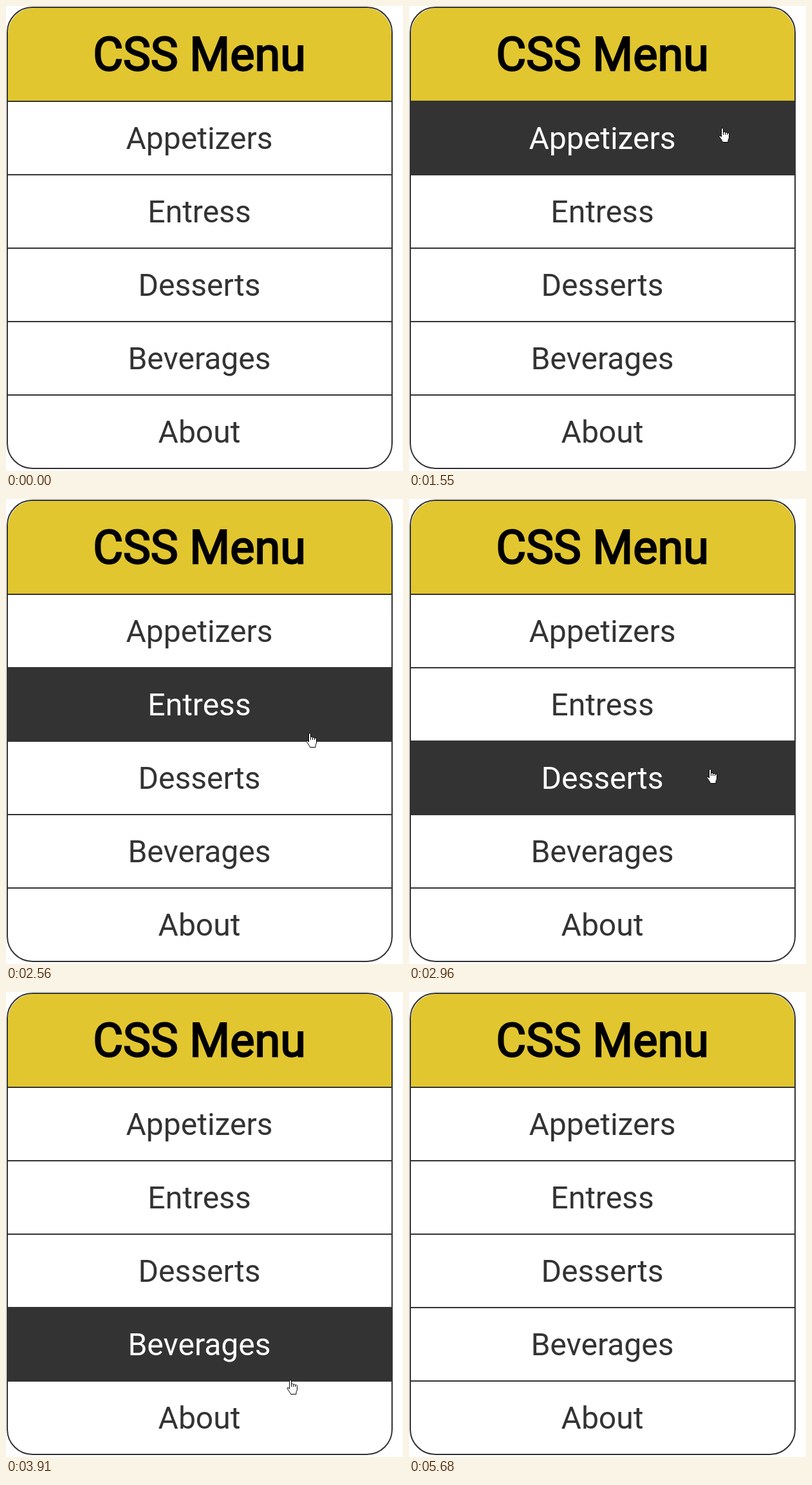
Recreate the animation shown at these times as an HTML page. Size 617 px wide and 722 px high, loop 6020 ms.

```html
<!DOCTYPE html>
<html lang="en">
<head>
<meta charset="utf-8">
<title>CSS Menu</title>
<style>
  html, body { margin: 0; width: 100%; height: 100%; overflow: hidden; background: #fff; }
  svg { display: block; width: 617px; height: 722px; }
  text { font-family: Roboto, sans-serif; font-size: 48px; text-anchor: middle; fill: #333; }
  .title { font-size: 72px; fill: #000; stroke: #000; stroke-width: 2.25px; }
  .row rect { fill: #fff; }
  .row.hover rect { fill: #333; }
  .row.hover text { fill: #fff; }
  .border { fill: none; stroke: #333; stroke-width: 2; }
  #cursor path { fill: #fff; stroke: #000; stroke-linejoin: round; }
</style>
</head>
<body>
<svg viewBox="0 0 617 722">
  <clipPath id="inside"><rect x="3" y="3" width="596" height="714" rx="40"/></clipPath>
  <g clip-path="url(#inside)">
    <rect width="617" height="148" fill="#e1c62f"/>
    <text class="title" x="300.5" y="100">CSS Menu</text>
    <g id="rows"></g>
  </g>
  <rect class="border" x="2" y="2" width="598" height="716" rx="39"/>
  <g id="cursor">
    <path id="arrow" d="M.5 .5V17L4.3 13.4L7 19.3L9.4 18.2L6.8 12.4H12z"/>
    <g id="hand">
      <path d="M-1.5 14V2a1.5 1.5 0 0 1 3 0V6.5q2.2-1 3 .8q2.2-.8 3 .8q2.6-.6 3 1.5V15q0 2-1.5 4V22.5H.5q-.5-2-2.5-4.5l-3-4.5q0-2.8 3.5 .5z"/>
      <path d="M1.5 6.5V11M4.5 7.3V11M7.5 8.1V11"/>
    </g>
  </g>
</svg>
<script>
const LOOP = 6020, STEP = 1000 / 15, FIRST_ROW = 148, ROW_HEIGHT = 114;
const byId = id => document.getElementById(id);

// Places the pointer passes, with arrival time and optional pause
const stops = [
  { at: 140, x: 594, y: 34 },
  { at: 620, x: 501, y: 54, pause: 203 },
  { at: 1950, x: 477, y: 282 },
  { at: 2960, x: 468, y: 419 },
  { at: 3490, x: 453, y: 562, pause: 210 },
  { at: 3910, x: 442, y: 602 },
  { at: 4450, x: 430, y: 671, pause: 883 },
  { at: 5680, x: 660, y: 640 }
];

const rows = ["Appetizers", "Entress", "Desserts", "Beverages", "About"].map((label, i) => {
  const top = FIRST_ROW + i * ROW_HEIGHT;
  byId("rows").insertAdjacentHTML("beforeend", `<g class="row">
    <rect y="${top}" width="617" height="${ROW_HEIGHT}"/>
    <path class="border" d="M2 ${top}H600"/>
    <text x="300.5" y="${top + 74}">${label}</text></g>`);
  return byId("rows").lastElementChild;
});

// Movement between stops is linear, shown at 15 steps a second.
function pointerAt(time) {
  const next = stops.findIndex(stop => stop.at > time);
  if (next < 1) return null;
  const from = stops[next - 1], to = stops[next];
  const leave = from.at + (from.pause ?? 0);
  const moved = Math.max(0, Math.floor((time - leave + 4) / STEP) * STEP);
  const k = Math.min(1, moved / (to.at - leave));
  const mix = axis => Math.round(from[axis] + (to[axis] - from[axis]) * k);
  return { x: mix("x"), y: mix("y") };
}

const show = (id, visible) => { byId(id).style.display = visible ? "" : "none"; };

function render(time) {
  const pointer = pointerAt(time);
  const hovered = pointer && pointer.x < 600
    ? Math.floor((pointer.y - FIRST_ROW) / ROW_HEIGHT) : -1;
  rows.forEach((row, i) => row.classList.toggle("hover", i === hovered));
  show("cursor", pointer);
  show("arrow", hovered < 0);
  show("hand", hovered >= 0);
  if (pointer) byId("cursor").setAttribute("transform", `translate(${pointer.x} ${pointer.y})`);
}

const start = performance.now();
function tick() {
  render((performance.now() - start) % LOOP);
  requestAnimationFrame(tick);
}
tick();
</script>
</body>
</html>
```
